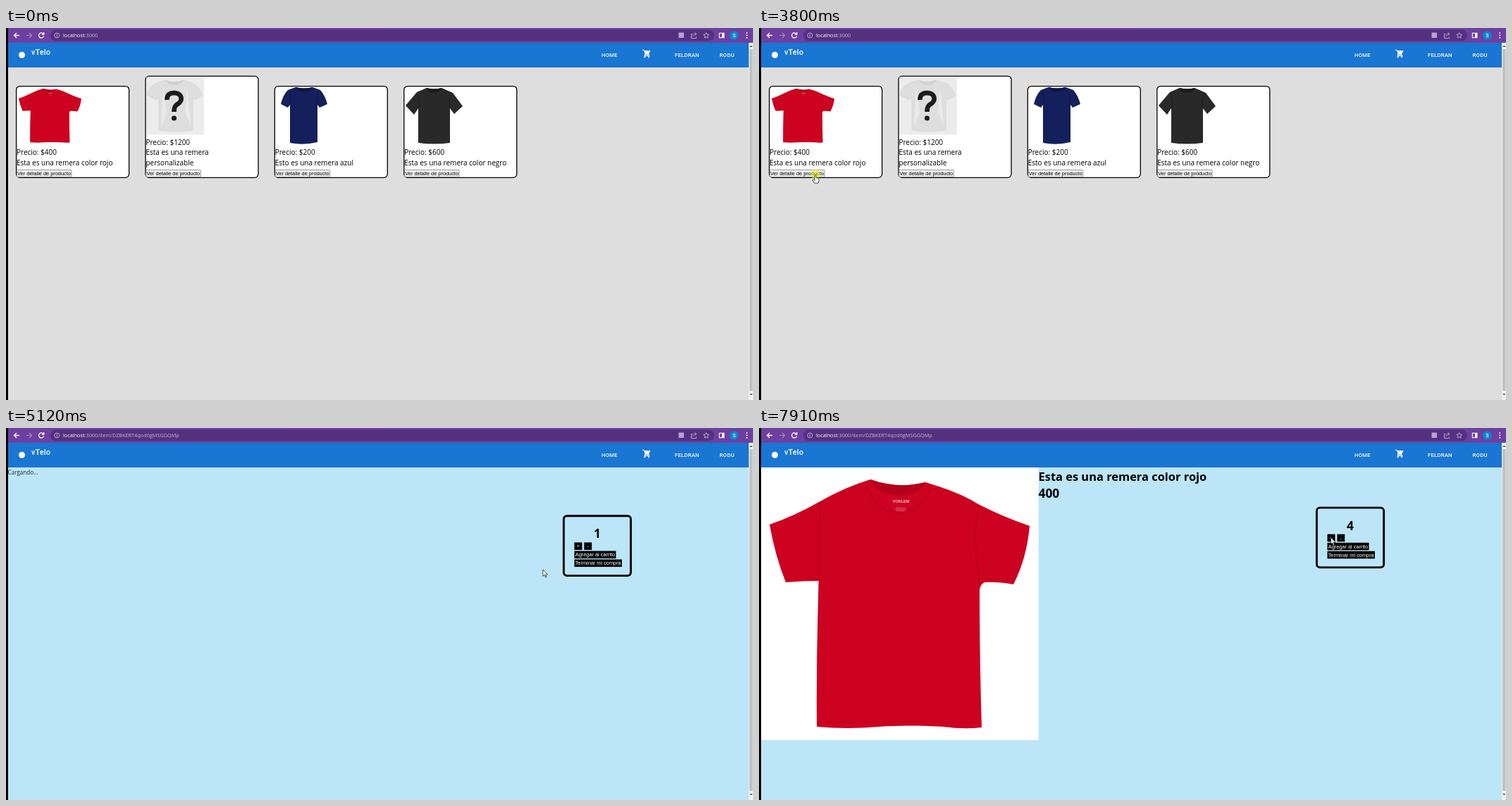
These frames come from a looping animation (1060 by 528 pixels, 8 s). An HTML page:

```html
<!DOCTYPE html>
<html lang="es">
<head>
<meta charset="utf-8">
<title>Tienda de remeras</title>
<style>
  html, body { margin: 0; width: 100%; height: 100%; overflow: hidden; background: #dedede; }
  svg { display: block; width: 100%; height: 100%; }
  .body { font-family: "Open Sans", "Noto Sans", sans-serif; }
  .ui { font-family: "Liberation Sans", Arial, sans-serif; font-size: 7.36px; }
  .nav { font-family: Roboto, sans-serif; font-weight: 500; fill: #fff; }
  .link { font-size: 7.7px; letter-spacing: .22px; }
  .big { font-weight: 700; font-size: 17.4px; }
</style>
</head>
<body>
<svg id="stage" viewBox="0 0 1060 528" xmlns="http://www.w3.org/2000/svg"></svg>
<script>
const LOOP = 8000, OPEN = 3865, LOADED = 6195;
const ADD_CLICKS = [6970, 7370, 7770];
const CARDS = [
  { x: 14, y: 82, price: 400, lines: ["Esta es una remera color rojo"] },
  { x: 197.4, y: 67.7, price: 1200, lines: ["Esta es una remera", "personalizable"] },
  { x: 380.7, y: 82, price: 200, lines: ["Esto es una remera azul"] },
  { x: 564.2, y: 82, price: 600, lines: ["Esta es una remera color negro"] }
];
// Pointer path: time, x, y
const PATH = [
  [580, 958, 503], [730, 870, 445], [990, 870, 445], [1470, 532, 265], [1670, 532, 265],
  [2050, 385, 205], [2440, 566, 198], [2580, 588, 198], [2720, 635, 204], [2900, 480, 193],
  [3100, 250, 214], [3250, 120, 206], [3430, 19, 204], [3600, 80, 208], [3870, 80, 207.5],
  [4560, 634, 261], [4630, 660, 262], [4900, 738, 215], [5390, 791, 184], [5870, 811, 171.5],
  [6470, 811, 171.5], [6750, 811.5, 159], [6970, 811.5, 157], [7370, 811.5, 155.5]
];

const rect = (x, y, w, h, fill, more = "") =>
  `<rect x="${x}" y="${y}" width="${w}" height="${h}" fill="${fill}" ${more}/>`;
const text = (x, y, str, cls, more = "") =>
  `<text x="${x}" y="${y}" class="${cls}" ${more}>${str}</text>`;
const path = (d, fill, more = "") => `<path d="${d}" fill="${fill}" ${more}/>`;
const line = (d, color, width, more = "") =>
  path(d, "none", `stroke="${color}" stroke-width="${width}" ${more}`);
const circle = (x, y, r, fill, more = "") =>
  `<circle cx="${x}" cy="${y}" r="${r}" fill="${fill}" ${more}/>`;

function browserBar() {
  const lilac = "#d5c6e6";
  return rect(0, 0, 1060, 21, "#6c3fa1") + rect(400, 0, 140, 1, "#7f2fae") +
    rect(63, 2.5, 942, 16, "#54317e", 'rx="8"') +
    line("M19 10.5H11.5M15 7l-3.5 3.5L15 14", "#fff", 1.3) +
    line("M29 10.5h7.5M33 7l3.5 3.5L33 14", "#a589c4", 1.1) +
    line("M53 8.2a3.6 3.6 0 1 0 .6 3.2M53.8 6v3h-3", "#fff", 1.3) +
    circle(72.3, 10.5, 3.5, "none", `stroke="${lilac}" stroke-width=".8"`) +
    line("M72.3 9.8v2.6M72.3 8.2v.9", lilac, .9) +
    `<text x="81" y="13.2" class="body" font-size="7.3" fill="#fff">localhost<tspan fill="#c3b1d8">:3000<tspan id="route"></tspan></tspan></text>` +
    rect(954.5, 6.5, 7.5, 7.5, "#b7a3cd") +
    line("M974.5 8.5h-2v6h7v-2M974.8 12c.2-2.6 1.8-3.7 4.2-3.7M977.5 6.3l2.3 2-2.3 2", lilac, .8) +
    line("M993.7 6.6l1.2 2.5 2.8.3-2.1 1.9.6 2.8-2.5-1.4-2.5 1.4.6-2.8-2.1-1.9 2.8-.3z", lilac, .8) +
    rect(1012.3, 7.3, 6.6, 6.4, "none", 'stroke="#fff" stroke-width="1.1"') +
    rect(1016, 7.3, 3, 6.4, "#fff") +
    circle(1033.3, 10.5, 6.2, "#0288d1") +
    text(1033.3, 13, "S", "nav", 'font-size="7" text-anchor="middle"') +
    [7, 10.5, 14].map(y => circle(1051.3, y, .9, "#fff")).join("");
}

function siteHeader() {
  return rect(3, 21, 1051, 35, "#1976d2") + circle(22.5, 38.3, 4.5, "#fff") +
    text(36, 38.2, "vTelo", "nav", 'font-size="11" letter-spacing=".08"') +
    text(845, 40.9, "HOME", "nav link") + text(949, 40.9, "FELDRAN", "nav link") +
    text(1012.6, 40.9, "RODU", "nav link") +
    line("M903 31.3h2l3.2 6.4h5", "#fff", 1.1) +
    path("M905.2 31.9h8.8q.6.2.2.9l-2.2 4q-.3.6-1 .6h-3.3z", "#fff") +
    line("M907.4 36.4l-1.1 1.9q-.3 1.1.7 1.1h6.3", "#fff", 1.1) +
    circle(906.4, 41.2, 1.15, "#fff") + circle(912, 41.2, 1.15, "#fff");
}

function scrollbar() {
  return rect(1054, 21, 6, 507, "#f1f1f1") + rect(1055, 30, 4.6, 485, "#c1c1c1") +
    path("M1055 27l2.3-2.6 2.3 2.6z", "#606060") + path("M1055 519l2.3 2.6 2.3-2.6z", "#606060");
}

function redShirt() {
  const shade = "#a80019";
  return path("M158 73Q197 87 236 77Q284 91 311 108Q346 126 384 139Q380 185 361 222Q338 218 320 219Q313 223 313 230Q313 330 316 425Q290 428 262 424Q210 421 170 424Q125 428 82 424Q81 320 85 217Q62 217 38 219Q23 182 15 137Q50 125 87 104Q122 84 158 73Z", "#cc0220") +
    path("M158 73Q197 87 236 77L233 80Q225 93 199 94Q172 92 162 77Z", "#b5001b") +
    line("M151 77Q163 119 200 121Q236 118 244 81", shade, 1.2, 'opacity=".7"') +
    line("M159 75Q170 94 200 95Q228 93 235 78", shade, 1) +
    line("M87 105Q84 160 85 217L84 300M311 109Q302 160 314 228", shade, 1.2, 'opacity=".6"') +
    line("M38 215Q62 213 85 213M320 215Q340 214 361 218M82 418Q200 415 316 419", shade, .7, 'opacity=".6"') +
    text(201.5, 105.5, "VORLEM", "ui", 'style="font-size:5.6px" font-weight="700" fill="#f2c5cb" text-anchor="middle"') +
    line("M194 113.5h14M193 115.5h16M195 117.5h12", "#df7d89", .7);
}

function questionShirt() {
  return rect(199, 69.8, 82, 81.6, "#ececec") +
    path("M227 74Q239 79 251 74L264 78Q274 82 279 96L267 102L265 98V145Q240 149 217 145V98L213 102L200 95Q203 82 214 78Z", "#dedede", 'stroke="#cfcfcf" stroke-width=".6"') +
    path("M227 74Q239 79 251 74Q249 81 239 81Q229 81 227 74Z", "#d0d0d0") +
    path("M223 83L220 140L228 120zM257 84L262 138L254 119z", "#eaeaea") +
    line("M228.5 102Q228 92 239 92Q249.500 93 248.500 102Q247.500 106 242 109Q238.500 111.500 238.500 119", "#1c1c1e", 6.6) +
    circle(238.5, 128, 3.6, "#1c1c1e");
}

function blueShirt() {
  return path("M411 84Q423 87 435 84L446 88Q453 96 456 108L445 113L442 109V162Q422 167 403 163V109L400 113L390 108Q393 95 400 88Z", "#14205c") +
    path("M411 84Q423 87 435 84Q433 91 423 91Q413 91 411 84Z", "#0d1646") +
    line("M403 109Q405 100 403 93M442 109Q440 100 442 93", "#0c153f", .8);
}

function blackShirt() {
  return path("M597 85Q608 88 618 85L634 92L648 111L636 122L630 114V163Q607 166 585 163V114L579 123L567 110L583 91Z", "#292929") +
    path("M597 85Q608 88 618 85Q616 92 607 92Q599 92 597 85Z", "#191919") +
    line("M585 114Q588 102 584 95M630 114Q627 102 631 95", "#171717", .8);
}

function card({ x, y, price, lines }) {
  const bottom = 212.3, first = 194.6 - 14.4 * (lines.length - 1);
  return rect(x + .6, y + .6, 160, bottom - y - .6, "#fff", 'rx="5" stroke="#000" stroke-width="1.3"') +
    text(x + 1, first - 14.4, "Precio: $" + price, "body", 'font-size="10"') +
    lines.map((s, i) => text(x + 1, first + 14.4 * i, s, "body", 'font-size="10"')).join("") +
    rect(x + 1.3, 201.4, 77.6, 10, "#efefef", 'rx="1" stroke="#707070" stroke-width=".7"') +
    text(x + 2.1, 208.9, "Ver detalle de producto", "ui");
}

function storePage() {
  return rect(3, 56, 1051, 472, "#dedede") + CARDS.map(card).join("") +
    `<g transform="translate(18 86) scale(.241 .2175) translate(-15 -73)">${redShirt()}</g>` +
    questionShirt() + blueShirt() + blackShirt();
}

function counterBox() {
  const button = (x, y, w, label) =>
    rect(x, y, w, 10.6, "#000") +
    text(x + w / 2, y + 7.9, label, "ui", 'fill="#fff" text-anchor="middle"');
  return rect(791.4, 124.8, 95.2, 84.8, "none", 'rx="4.500" stroke="#000" stroke-width="2.900"') +
    text(839, 156.4, "1", "body big", 'id="count" text-anchor="middle"') +
    button(806.5, 162.4, 11, "+") + button(820.4, 162.4, 10.8, "-") +
    button(806.5, 174.5, 59, "Agregar al carrito") + button(806.5, 186.5, 67.4, "Terminar mi compra");
}

function detailPage() {
  return rect(3, 56, 1051, 472, "#bce5f7") +
    `<g id="loading">${text(2.6, 66, "Cargando...", "body", 'font-size="8.1" fill="#1d2b33"')}</g>` +
    `<g id="product">${rect(3, 56, 393.7, 387, "#fff")}${redShirt()}` +
    text(396.5, 75.4, "Esta es una remera color rojo", "body", 'font-size="16.45" font-weight="700"') +
    text(396.5, 99.2, "400", "body big") + `</g><g id="box">${counterBox()}</g>`;
}

function pointer() {
  const edge = 'stroke="#222" stroke-width=".8" stroke-linejoin="round"';
  return `<g id="pointer">${circle(0, 0, 7, "#f2ee1c", 'id="halo" opacity=".55"')}` +
    `<g id="arrow">${path("M0 0V9.300L2.200 7.400L3.700 11L5.200 10.300L3.700 6.900H6.600Z", "#fff", edge)}</g>` +
    `<g id="hand">${path("M-1 1Q0-.6 1 1V5L4 5.500Q5 6 5 7.500V9.500L4 12.500H-1.500L-4 8.500Q-4 7-2.500 7.500L-1 9Z", "#fff", edge)}</g></g>`;
}

const stage = document.getElementById("stage");
stage.innerHTML = `<g id="store">${storePage()}</g><g id="detail">${detailPage()}</g>` +
  siteHeader() + browserBar() + scrollbar() + rect(0, 0, 3, 528, "#000") + pointer();

const $ = id => document.getElementById(id);
const show = (id, on) => $(id).setAttribute("display", on ? "inline" : "none");
const within = (t, from, span) => t >= from && t < from + span;

function pointerAt(t) {
  const i = PATH.findIndex(k => k[0] > t);
  if (i < 0) return PATH[PATH.length - 1].slice(1);
  if (i === 0) return PATH[0].slice(1);
  const [t0, x0, y0] = PATH[i - 1], [t1, x1, y1] = PATH[i];
  const p = (t - t0) / (t1 - t0);
  return [x0 + (x1 - x0) * p, y0 + (y1 - y0) * p];
}

function placeBox(t) {
  const p = Math.min(1, Math.max(0, (t - 3850) / 940)), rest = 1 - p;
  const x = 839 + 35 * rest, y = (t < LOADED ? 167.2 : 155.5) + 40 * rest;
  $("box").setAttribute("transform", `translate(${x} ${y}) scale(${1 - .43 * rest}) translate(-839 -167.2)`);
  $("box").setAttribute("opacity", p);
}

function draw(t) {
  const store = t < OPEN, loaded = t >= LOADED;
  show("store", store);
  show("detail", !store);
  show("loading", !loaded);
  show("product", loaded);
  $("route").textContent = store ? "" : "/item/DZBKERT4qod6gMSGGQMp";
  $("count").textContent = 1 + ADD_CLICKS.filter(c => t >= c + 70).length;
  placeBox(t);

  const [x, y] = pointerAt(t);
  const overButton = store && y > 201 && y < 212 && CARDS.some(c => x > c.x && x < c.x + 79);
  show("pointer", t >= PATH[0][0]);
  $("pointer").setAttribute("transform", `translate(${x} ${y})`);
  show("hand", overButton);
  show("arrow", !overButton);
  show("halo", within(t, 3795, 70) || ADD_CLICKS.some(c => within(t, c, 135)));
}

const start = performance.now();
function tick() {
  draw((performance.now() - start) % LOOP);
  requestAnimationFrame(tick);
}
tick();
</script>
</body>
</html>
```
